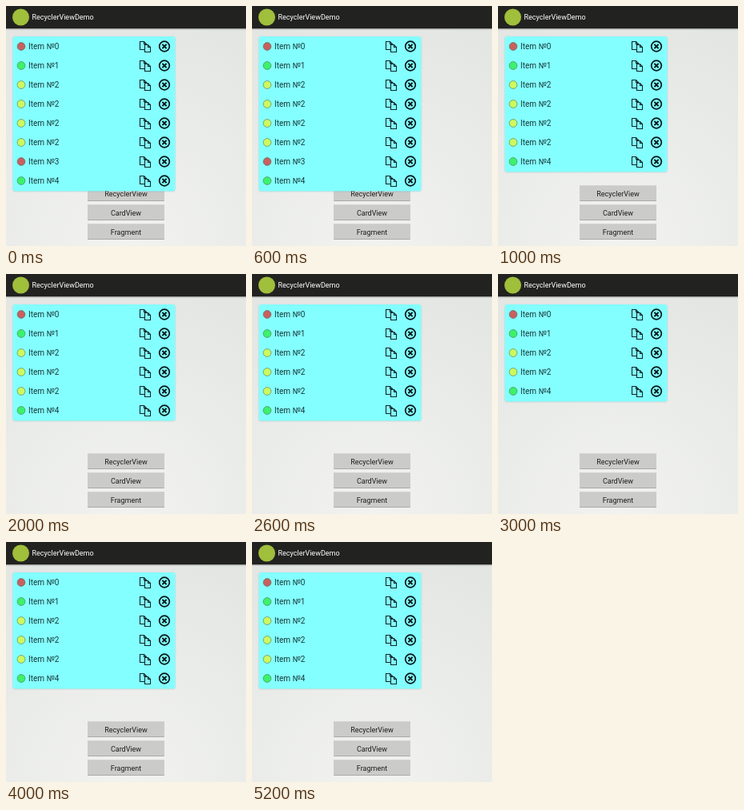
Write an HTML page with a canvas that moves like this. It is 300 px wide and 300 px high and loops after 6000 ms.

```html
<!DOCTYPE html>
<html lang="en">
<head>
<meta charset="utf-8">
<title>RecyclerViewDemo</title>
<style>
html, body { margin: 0; width: 100%; height: 100%; overflow: hidden; background: #ececec; }
canvas { display: block; width: 300px; height: 300px; }
</style>
</head>
<body>
<canvas id="stage"></canvas>
<script>
const SIZE = 300, LOOP = 6000, ROW = 24;
const FONT = 'Roboto, "Noto Sans", sans-serif';
const RED = '#c9605f', GREEN = '#3cf26a', YELLOW = '#cbf95f';
const DOTS = [RED, GREEN, YELLOW, RED, GREEN];

// Each state of the list and the time it appears
const STATES = [
  [0, [0, 1, 2, 2, 2, 2, 3, 4]],
  [1000, [0, 1, 2, 2, 2, 2, 4]],
  [2000, [0, 1, 2, 2, 2, 4]],
  [3000, [0, 1, 2, 2, 4]],
  [4000, [0, 1, 2, 2, 2, 4]]
];

const canvas = document.getElementById('stage');
const ctx = canvas.getContext('2d');
const scale = window.devicePixelRatio || 1;
canvas.width = canvas.height = SIZE * scale;
ctx.scale(scale, scale);

function rect(x, y, w, h, color) {
  ctx.fillStyle = color;
  ctx.fillRect(x, y, w, h);
}

function roundRect(x, y, w, h, r, color) {
  ctx.beginPath();
  ctx.roundRect(x, y, w, h, r);
  ctx.fillStyle = color;
  ctx.fill();
}

function circle(x, y, r) {
  ctx.beginPath();
  ctx.arc(x, y, r, 0, Math.PI * 2);
}

function text(str, x, y, size, color, align = 'left') {
  ctx.font = `${size}px ${FONT}`;
  ctx.textAlign = align;
  ctx.fillStyle = color;
  ctx.fillText(str, x, y);
}

function path(points, close) {
  ctx.beginPath();
  points.forEach(([x, y]) => ctx.lineTo(x, y));
  if (close) ctx.closePath();
  ctx.stroke();
}

function background() {
  const g = ctx.createRadialGradient(150, SIZE, 0, 150, SIZE, 290);
  g.addColorStop(0, '#f2f3f1');
  g.addColorStop(1, '#e4e6e3');
  rect(0, 0, SIZE, SIZE, g);
}

function actionBar() {
  rect(0, 0, SIZE, 28, '#222321');
  const g = ctx.createLinearGradient(0, 28, 0, 30);
  g.addColorStop(0, 'rgba(0, 0, 0, 0.4)');
  g.addColorStop(1, 'rgba(0, 0, 0, 0)');
  rect(0, 28, SIZE, 2, g);
  circle(18.5, 14, 10.5);
  ctx.fillStyle = '#a0bf3b';
  ctx.fill();
  text('RecyclerViewDemo', 32.5, 17, 9, '#ffffff');
}

function button(label, y) {
  roundRect(102, y, 96, 20, 1, '#a9a9a9');
  roundRect(102, y, 96, 19, 1, '#cbccca');
  rect(102.5, y, 95, 1, '#d4d5d3');
  text(label, 150, y + 13.5, 9, '#1c1c1c', 'center');
}

function page(x, y, w, h, fold) {
  const r = x + w, b = y + h;
  ctx.fillStyle = '#84ffff';
  ctx.fillRect(x, y, w - fold, h);
  path([[x, y], [r - fold, y], [r, y + fold], [r, b], [x, b]], true);
  path([[r - fold, y], [r - fold, y + fold], [r, y + fold]]);
}

function copyIcon(y) {
  ctx.strokeStyle = '#10282b';
  ctx.lineWidth = 1.1;
  page(167.5, y - 6, 8, 10, 3);
  page(173.5, y - 2, 7, 9, 3);
}

function closeIcon(x, y) {
  ctx.strokeStyle = '#061718';
  ctx.lineWidth = 1.7;
  circle(x, y, 6.3);
  ctx.stroke();
  ctx.lineWidth = 2;
  path([[x - 2.6, y - 2.6], [x + 2.6, y + 2.6]]);
  path([[x + 2.6, y - 2.6], [x - 2.6, y + 2.6]]);
}

function item(n, y) {
  circle(19, y, 4.9);
  ctx.fillStyle = DOTS[n];
  ctx.fill();
  ctx.lineWidth = 0.8;
  ctx.strokeStyle = 'rgba(80, 100, 80, 0.7)';
  ctx.stroke();
  text('Item №' + n, 28, y + 3.5, 10, '#17393b');
  copyIcon(y);
  closeIcon(198, y);
}

function card(items) {
  const h = items.length * ROW + 2;
  ctx.save();
  ctx.shadowColor = 'rgba(0, 0, 0, 0.14)';
  ctx.shadowBlur = 2 * scale;
  ctx.shadowOffsetY = 0.5 * scale;
  roundRect(8.5, 38, 203, h - 0.5, 3, '#84ffff');
  ctx.restore();
  items.forEach((n, i) => item(n, 50.5 + i * ROW));
}

function draw(t) {
  const [, items] = STATES.findLast(([start]) => t >= start);
  background();
  actionBar();
  ['RecyclerView', 'CardView', 'Fragment'].forEach((s, i) => button(s, 224 + i * ROW));
  card(items);
}

function tick() {
  draw(performance.now() % LOOP);
  requestAnimationFrame(tick);
}
tick();
</script>
</body>
</html>
```
